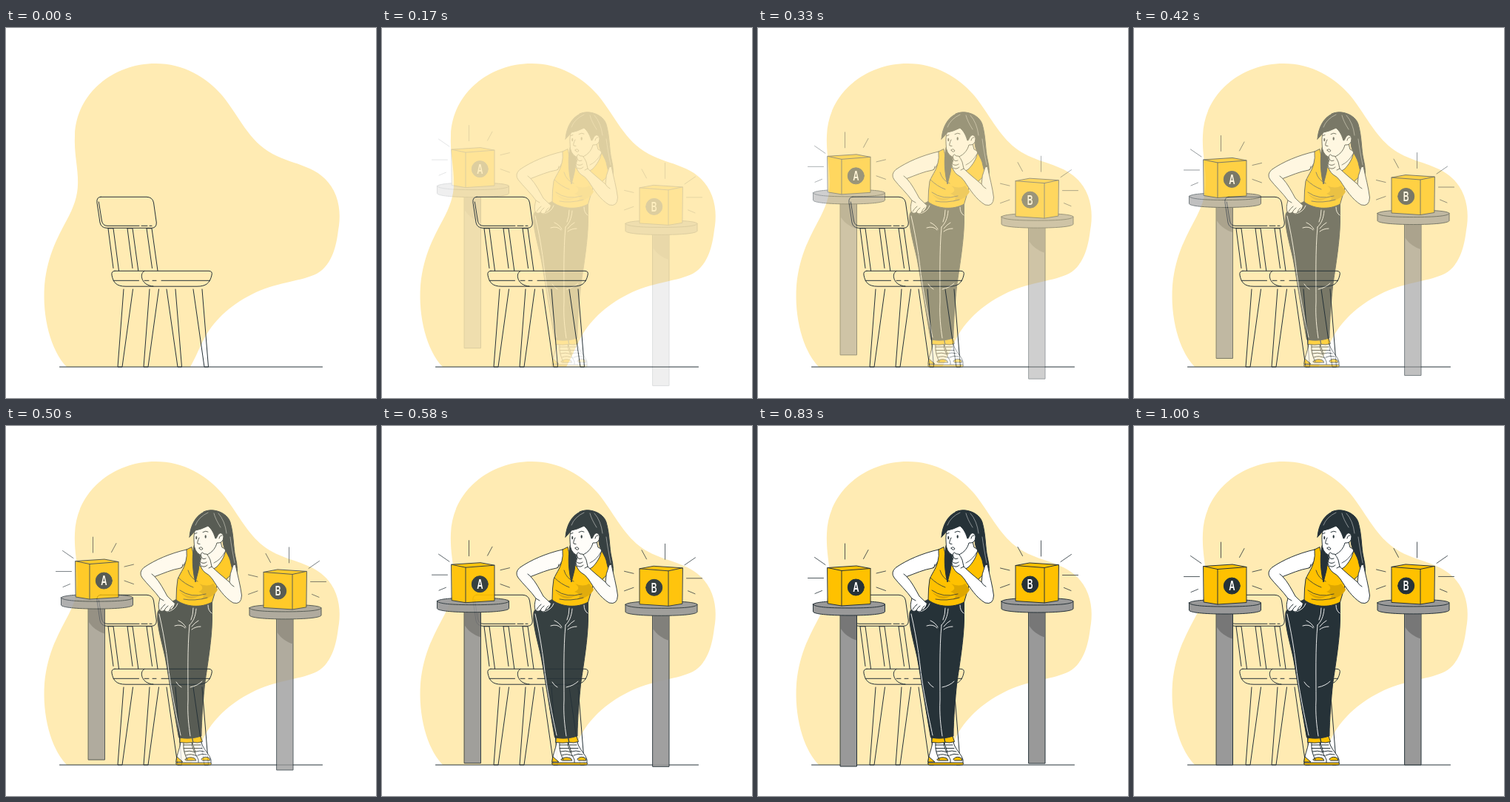
Write an HTML page that moves like this. It is 500 px wide and 500 px high and loops after 1.04 s.

```html
<!DOCTYPE html>
<html lang="en">
<head>
<meta charset="utf-8">
<title>Choosing between A and B</title>
<style>
  html, body { margin: 0; width: 100%; height: 100%; overflow: hidden; background: #fff; }
  svg { display: block; width: 100%; height: 100%; }
  .ink { stroke: #263238; stroke-width: 1; stroke-linecap: round; stroke-linejoin: round; fill: none; }
  .skin { fill: #fff; }
  .gold { fill: #ffc100; }
  .dark { fill: #263238; }
  .grey { fill: #999; }
  .light { stroke: #fff; stroke-width: .9; }
  .shade { stroke: none; }
  .letter { font: bold 18px "Liberation Sans", Arial, sans-serif; fill: #fff; stroke: none; text-anchor: middle; }
</style>
</head>
<body>
<svg viewBox="0 0 500 500">
  <defs>
    <g id="pillar">
      <rect class="grey" x="111.5" y="248" width="22" height="210"/>
      <path class="shade" fill="#777" d="M112 254H133V287.500C125 285 117 280 112 272Z"/>
      <path class="grey" d="M74.500 239V249C76 252 94 254 123 254S170 252 171.500 249V239Z"/>
      <path class="grey" d="M74.500 239C76 236 94 234.500 123 234.500S170 236 171.500 239C170 242.500 152 244 123 244S76 242.500 74.500 239Z"/>
    </g>
    <g id="parcel">
      <path stroke-width=".8" d="M117.500 157V178M149 165.500L142.500 177.500M76.500 175.500L91 185.500M67.500 203.500H88.500M77 224.500L86.500 220.500M160 197L172.500 194M160 216L172.500 220.500"/>
      <path class="gold" d="M94 189.500L133 187L152 190.500V238.500L113 241L94.500 238Z"/>
      <path d="M94 189.500L113 193.500L152 190.500M113 193.500V241"/>
      <circle class="dark" cx="132.300" cy="216" r="11"/>
    </g>
  </defs>

  <path fill="#ffebb3" d="M82 458C60 435 49 390 52 348C56 305 72 279 85 254C94 236 98 222 97 202C96 182 92 168 93 145C95 88 145 48 202 48C240 48 270 66 292 91C315 119 328 153 360 170C389 186 425 185 443 220C452 238 452 258 449 273C447 290 442 320 420 332C400 342 370 343 338 357C306 372 283 393 270 416C262 430 256 446 249 458Z"/>
  <path class="ink" d="M72.500 458H427.500"/>

  <g class="ink">
    <path d="M128 228.300H190Q198 228.500 199.500 236L203.300 263Q203.500 270 197 270.300H136Q128.500 270 127 263L123 236Q122 228.500 128 228.300Z"/>
    <path d="M125.300 235L129.500 261Q131 267.300 137 267.300H180M183 267.300H191M194 267.300H197"/>
    <path d="M138 270.800H145L152.500 328M138 270.800L145 324.500M164 270.800H171L178.800 328M164 270.800L171 324.500M190 270.800H197L205 328M190 270.800L197.500 324.500"/>
    <path d="M147 328.300H274Q279.500 328.500 278 334C275.500 345 270 349.200 258 349.200H162C149 349.200 145 344 143 334Q142 328.500 147 328.300Z"/>
    <path d="M187 328.500C180 331 182 348 199 349M145 341.300H179.500M187 341.300H193M198 341.300H203M210 341.300H275.500"/>
    <path d="M159 353L151 458H157L171.500 353M194 353L186 458H192L206.500 353M217 353L232 458H237.500L229 353M253 353L268 458H273.500L265 353"/>
  </g>

  <g id="left" class="ink">
    <use href="#pillar"/>
    <use href="#parcel"/>
    <text class="letter" transform="translate(132.400 222.400) scale(.64 1)">A</text>
  </g>

  <g id="right" class="ink">
    <use href="#pillar" x="254.500"/>
    <use href="#parcel" transform="matrix(-1 0 0 1 500 0)"/>
    <text class="letter" transform="translate(367.700 222.400) scale(.6 1)">B</text>
  </g>

  <g id="woman" class="ink">
    <!-- shoes -->
    <path class="skin" d="M252 426H264C265 436 275 443 277 451V456H250Z"/>
    <path class="skin" d="M236 426H251C251 437 257 444 260 451V456H230.500C229 446 235 438 236 426Z"/>
    <path class="gold" d="M230 455H277Q278.500 458 275 458H231Q229 458 230 455ZM231 447L239 454H230ZM242 450.500Q247 446 255 449L257 452H244ZM264 450Q269 445 275 449L276 452H266Z"/>
    <path d="M240 431H251M240 435.500H253M241 440Q248 438 255 440.500M243 445Q250 442 258 446M254 431H263M254 435.500H265M256 440Q262 438 268 440M259 445Q265 442 271 444M240 428Q239 440 245 451M252 428L256 441"/>
    <path class="gold" d="M236 419.500H251L253 427.500Q244 429 235 427.500ZM252 419.500H263L265.500 426.500Q259 429 253 427.500Z"/>

    <!-- trousers -->
    <path class="dark" d="M231 234C221 239 207 244 205 252C203 268 211 293 215 312C220 340 227 385 233.500 421Q249 424 264 419C264 395 267 365 268.500 349C273 318 278 288 278.500 262V238Z"/>
    <path class="light" d="M248 269C245 300 246 340 246 370C245 390 247 405 249 419"/>
    <path class="light" d="M207 254C213 280 217 305 220 332C224 362 231 395 236 418" stroke-dasharray="26 1"/>
    <path class="light" d="M257 247C256 258 253 264 248 269M253 246Q253 255 250 262M218 251Q229 249 232 240M273 242Q273 250 278 253M228 270Q237 267 242 273M233 263Q240 266 243 272M251 275Q256 271 263 271M251 271Q256 265 260 263M230 346Q233 351 237 353M249 353Q259 351 265 345"/>

    <!-- neck and chest -->
    <path class="skin" d="M268 168L289 153L292 164L302 169L293 199H268L254 180Z"/>

    <!-- top -->
    <path class="gold" d="M244 167L251 163.500C254 180 260 193 274 194Q281 194 284 191C290 185 295 178 297 167L304 170C309 175 311 184 309 192C304 205 293 211 286 213Q282 226 278.500 238C264 246 243 245 230 235Q230 219 232 207C236 197 243 190 243 180Z"/>
    <path class="shade" fill="#dea700" d="M261 213Q272 218 280 213L286 221Q282 231 263 235Q272 228 260 224Q270 220 261 213ZM235 224Q247 233 261 229Q247 239 235 224Z"/>
    <path stroke-width=".8" d="M233 205Q242 214 253 218M235 222Q250 233 270 227M240 234Q254 237 272 232M246 195Q249 206 259 210M281 185Q290 181 296 170"/>

    <!-- arm on the hip -->
    <path class="skin" d="M244 167C222 172 201 181 186 191.500Q179 198 184 205C191 214 201 223 208 233Q205 243 207 248Q210 252 214 249Q218 253 221 249Q226 248 228.500 240L218 230C213 221 208 211 201 203.500C213 199 224 194 236 192Q246 186 244 167Z"/>
    <path d="M208 233L213 236M214 249Q215 246 219 243M209 248Q211 244 215 241M221 249Q222 245 225 243M201 203.500L197 200M237 192Q239 190 239 187"/>

    <!-- hair behind -->
    <path class="dark" d="M267 116C280 110 299 117 303 130C308 147 307 164 310 177Q314 193 311.500 207Q306 198 304 186C302 173 293 168 293 154L285 137Z"/>
    <path class="dark" d="M254 162C251 177 252 196 256 211Q258 203 260 195L263 176Z"/>

    <!-- face -->
    <path class="skin" d="M256 138C253 147 254 155 254.500 163Q257 174 267 175.500C277 173 283 166 285 158Q294 159 294 149Q292 142 285 146L282 132H262Z"/>
    <path class="dark" d="M248 150C249 135 256 121 268 116C282 110 298 119 301 130Q304 145 302 162Q297 156 295 147Q290 141 286 148Q284 153 283 152C281 146 279 140 273 135Q263 140 256 141Q252 146 248 150Z"/>
    <path class="light" stroke-opacity=".5" stroke-width=".6" d="M273 117Q260 123 256 134M281 118Q283 126 290 137M287 118Q296 128 298 145M303 150Q305 165 309 185"/>
    <ellipse class="dark shade" cx="257.300" cy="151" rx="1" ry="2.200"/>
    <ellipse class="dark shade" cx="269.700" cy="149.500" rx="1.100" ry="2.300"/>
    <path d="M255 145.500L258 144.500M266 143.500Q270 141 273 143M261 151Q258 157 259 159L262 159.500M261 165Q264 162 266 166Q263 169 261 165M288 152Q289 147 292 148"/>

    <!-- arm to the chin -->
    <path class="skin" d="M264 177Q262 172 265.500 171Q268 174 271 173Q274 176 276 181L278 190C285 197 295 205 302 211Q302 200 307 188L310 187C313 202 317 216 318.500 229Q318 242 307 239C295 232 286 218 279 207Q275 201 269 198Q263 193 262 185Z"/>
    <path d="M264 177Q265 181 270 179M263 184Q267 187 271 184M264 189Q268 192 272 188M302 211Q304 215 308 217M278 190L274 192"/>
  </g>
</svg>
<script>
  const LOOP = 1040, FPS = 24, FADE_FROM = 2, FADE_STEPS = 13, DROP = 30, BOB = 2;
  const [left, right, woman] = ["left", "right", "woman"].map(id => document.getElementById(id));

  // Frame starts sit on a grid of 10 ms.
  const startOf = k => Math.round(k * 100 / FPS) * 10;

  function frameAt(t) {
    let k = Math.floor(t * FPS / 1000) + 1;
    while (startOf(k) > t) k--;
    return k;
  }

  function draw(t) {
    const k = frameAt(t);
    const shown = Math.min(1, Math.max(0, (k - FADE_FROM) / FADE_STEPS));
    const phase = Math.max(0, (k - 15.5) / 9);
    const bob = BOB * (1 - Math.cos(2 * Math.PI * phase)) / 2;
    const y = bob - DROP * (1 - shown);
    for (const part of [left, right, woman]) part.setAttribute("opacity", shown);
    left.setAttribute("transform", `translate(0 ${y})`);
    right.setAttribute("transform", `translate(0 ${-y})`);
  }

  const begin = performance.now();
  function tick() {
    draw((performance.now() - begin) % LOOP);
    requestAnimationFrame(tick);
  }
  tick();
</script>
</body>
</html>
```
